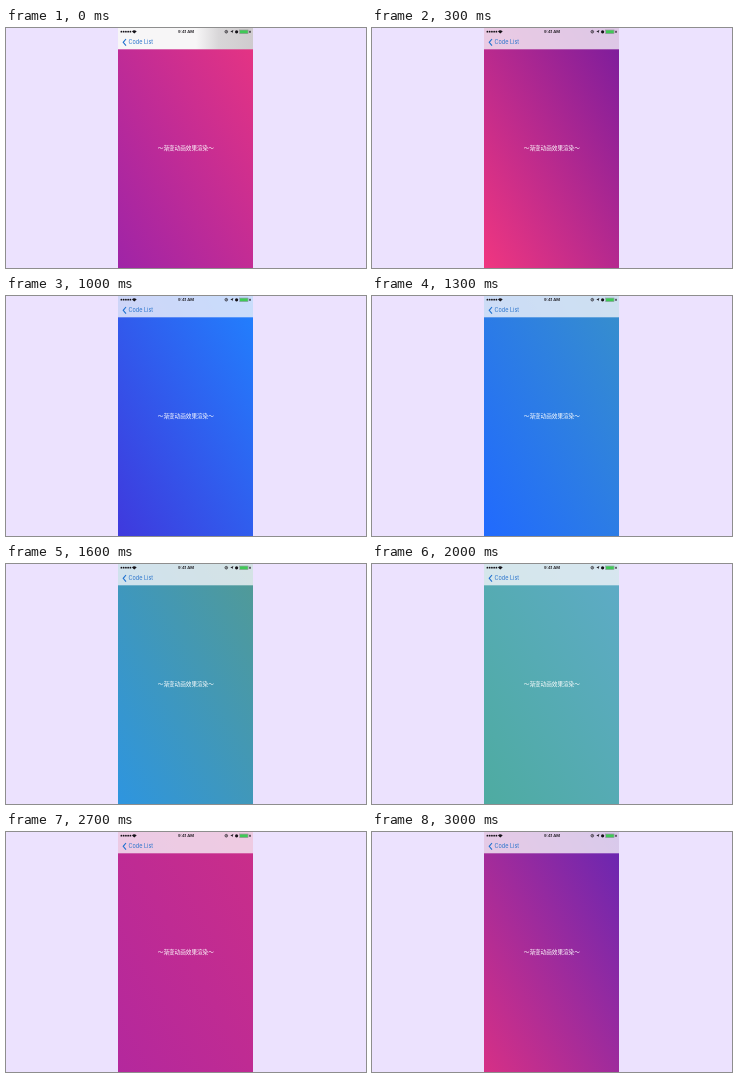
Write an HTML page with a canvas that moves like this. It is 360 px wide and 240 px high and loops after 3.1 s.

```html
<!DOCTYPE html>
<html lang="zh-CN">
<head>
<meta charset="utf-8">
<title>Gradient animation</title>
<style>
  html, body { margin: 0; width: 100%; height: 100%; overflow: hidden; background: #ece2fe; }
  canvas { display: block; width: 360px; height: 240px; }
</style>
</head>
<body>
<canvas id="stage" width="360" height="240"></canvas>
<script>
const ctx = document.getElementById('stage').getContext('2d');
const LOOP = 3100, STEP = 100;
const PHONE = { x: 112, w: 135, h: 240 }, NAV_H = 21.3;
const PALETTE = [
  [152, 34, 170], [240, 54, 128], [122, 28, 157], [34, 72, 253],
  [32, 158, 255], [90, 120, 127], [58, 255, 217]
];
// [time in ms, palette position]
const PACE = [[0, 0.08], [300, 1], [700, 1.93], [1300, 3.4], [2000, 5.38], [2400, 6.42], [3000, 8.22]];

const mix = (a, b, t) => a + (b - a) * t;

function paletteAt(pos) {
  const i = Math.floor(pos), n = PALETTE.length;
  const from = PALETTE[i % n], to = PALETTE[(i + 1) % n];
  return `rgb(${from.map((v, k) => Math.round(mix(v, to[k], pos - i))).join(',')})`;
}

function positionAt(time) {
  const i = Math.max(1, PACE.findIndex(key => key[0] >= time));
  const [t0, p0] = PACE[i - 1], [t1, p1] = PACE[i];
  return mix(p0, p1, (time - t0) / (t1 - t0));
}

function text(str, x, y, font, color, align = 'left') {
  ctx.font = font;
  ctx.fillStyle = color;
  ctx.textAlign = align;
  ctx.fillText(str, x, y);
}

function dot(x, y, r) {
  ctx.beginPath();
  ctx.arc(x, y, r, 0, Math.PI * 2);
  ctx.fill();
}

function line(points, color, width) {
  ctx.beginPath();
  points.forEach(([x, y]) => ctx.lineTo(x, y));
  ctx.strokeStyle = color;
  ctx.lineWidth = width;
  ctx.stroke();
}

function drawGradient(pos) {
  ctx.save();
  ctx.translate(PHONE.x, 0);
  ctx.scale(PHONE.w, PHONE.h);
  const fill = ctx.createLinearGradient(0, 1, 1, 0);
  fill.addColorStop(0, paletteAt(pos));
  fill.addColorStop(1, paletteAt(pos + 1));
  ctx.fillStyle = fill;
  ctx.fillRect(0, 0, 1, 1);
  ctx.restore();
}

function drawNavBar(time) {
  if (time < STEP) {
    const grey = ctx.createLinearGradient(190, 0, 247, 0);
    grey.addColorStop(0, '#f7f6f7');
    grey.addColorStop(0.4, '#d8d6d8');
    grey.addColorStop(1, '#cfcbce');
    ctx.fillStyle = grey;
  } else {
    ctx.fillStyle = 'rgba(249,248,251,0.78)';
  }
  ctx.fillRect(PHONE.x, 0, PHONE.w, NAV_H);
  line([[120, 11], [117.2, 14.3], [120, 17.6]], '#1f72d0', 1.1);
  text('Code List', 122.5, 16.3, '5.5px Inter, sans-serif', '#2a74cc');
}

function drawStatusBar() {
  const ink = '#151218';
  ctx.fillStyle = ink;
  for (let i = 0; i < 5; i++) dot(115.4 + i * 2.25, 3.7, 0.9);

  ctx.beginPath();
  ctx.moveTo(128.3, 5.4);
  ctx.arc(128.3, 5.4, 3, -Math.PI * 0.78, -Math.PI * 0.22);
  ctx.fill();

  text('9:41 AM', 180, 5.3, '600 4.1px Inter, sans-serif', ink, 'center');

  ctx.strokeStyle = ink;
  ctx.lineWidth = 0.7;
  ctx.beginPath();
  ctx.arc(220.3, 3.7, 1.3, 0, Math.PI * 2);
  ctx.stroke();
  dot(220.3, 3.7, 0.5);

  ctx.beginPath();
  ctx.moveTo(227.4, 2.1);
  ctx.lineTo(226.2, 5.3);
  ctx.lineTo(225.8, 3.9);
  ctx.lineTo(224.3, 3.5);
  ctx.fill();
  dot(230.6, 3.8, 1.6);

  ctx.fillStyle = '#3fc956';
  ctx.fillRect(234, 2.3, 7.8, 3);
  ctx.strokeStyle = 'rgba(40,60,45,0.65)';
  ctx.lineWidth = 0.4;
  ctx.strokeRect(233.7, 2, 8.4, 3.6);
  ctx.fillStyle = ink;
  ctx.fillRect(243.4, 2.8, 1.2, 2);
}

function draw(now) {
  const time = Math.floor((now % LOOP) / STEP) * STEP;
  ctx.fillStyle = '#ece2fe';
  ctx.fillRect(0, 0, 360, 240);
  drawGradient(positionAt(time));
  drawNavBar(time);
  drawStatusBar();
  text('～渐变动画效果渲染～', 179.8, 122.1,
    '5.6px "Noto Sans CJK SC", "Noto Sans CJK", sans-serif', '#fff', 'center');
}

const start = performance.now();
function tick() {
  draw(performance.now() - start);
  requestAnimationFrame(tick);
}
tick();
</script>
</body>
</html>
```
